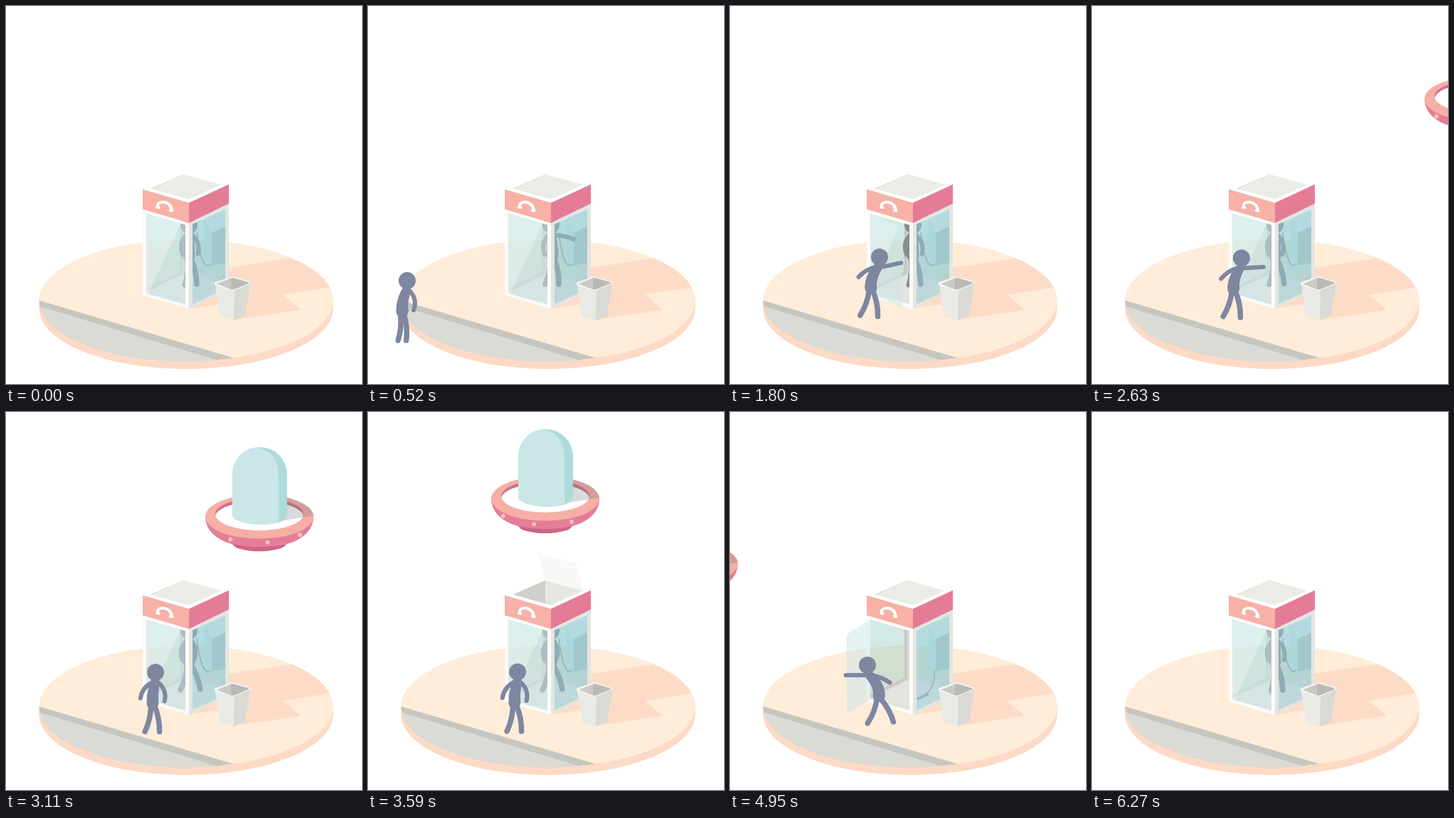
Recreate the animation shown at these times as an HTML page with a canvas. Size 500 px wide and 530 px high, loop 7.47 s.

```html
<!DOCTYPE html>
<html lang="en">
<head>
<meta charset="utf-8">
<title>Phone booth</title>
<style>
  html, body { margin: 0; width: 100%; height: 100%; overflow: hidden; background: #fff; }
  canvas { display: block; width: 500px; height: 530px; }
</style>
</head>
<body>
<canvas id="stage"></canvas>
<script>
const LOOP = 7470, STEP = 40, TAU = Math.PI * 2;
const canvas = document.getElementById('stage');
const ctx = canvas.getContext('2d');
const scale = window.devicePixelRatio || 1;
canvas.width = 500 * scale;
canvas.height = 530 * scale;

// ---- drawing helpers ----
function trace(points) {
  points.forEach((x, i) => {
    if (i % 2 === 0) ctx[i ? 'lineTo' : 'moveTo'](x, points[i + 1]);
  });
  ctx.closePath();
}
function poly(color, ...points) {
  ctx.beginPath();
  trace(points);
  ctx.fillStyle = color;
  ctx.fill();
}
function frame(color, outer, inner) {
  ctx.beginPath();
  trace(outer);
  trace(inner);
  ctx.fillStyle = color;
  ctx.fill('evenodd');
}
function oval(x, y, rx, ry = rx) {
  const path = new Path2D();
  path.ellipse(x, y, rx, ry, 0, 0, TAU);
  return path;
}
function fill(color, path) {
  ctx.fillStyle = color;
  ctx.fill(typeof path === 'string' ? new Path2D(path) : path);
}
function line(color, width, d) {
  ctx.strokeStyle = color;
  ctx.lineWidth = width;
  ctx.lineCap = ctx.lineJoin = 'round';
  ctx.stroke(new Path2D(d));
}
function clipped(path, draw) {
  ctx.save();
  ctx.clip(path);
  draw();
  ctx.restore();
}

// ---- motion helpers ----
function ramp(t, from, to) {
  const k = Math.min(1, Math.max(0, (t - from) / (to - from)));
  return k * k * (3 - 2 * k);
}
// Rises during the first span and falls back during the second.
const pulse = (t, a, b, c, d) => ramp(t, a, b) - ramp(t, c, d);
const mix = (a, b, k) => a.map((v, i) => v + (b[i] - v) * k);

// ---- figure: head position, hip offset, limb angles in degrees from straight down ----
const pose = (x, y, lean, arms, legs) => [x, y, lean, ...arms, ...legs];
const idle = y => pose(210, y, -4, [-37, 19], [-13, 11]);
const reach = pose(210, 352, -12, [-60, 102], [-20, 11]);
const pull = pose(193, 355, 16, [-90, 68], [-21, 29]);
const doorway = pose(224, 343, 4, [-30, 50], [-16, 20]);
const inside = pose(254, 309, 0, [-10, 12], [-6, 10]);
const stoop = pose(256, 315, -4, [-14, 25], [-6, 14]);
const talk = pose(257, 307, 0, [-10, 18], [-5, 13]);
const gesture = pose(257, 307, 2, [-10, 78], [-12, 10]);
const astride = pose(257, 307, 0, [-10, 4], [-15, 21]);

function walk(t) {
  const swing = Math.sin((t - 520) / 480 * TAU);
  return pose(55 + (t - 520) * .149, 385 - (t - 520) * .0317, -7,
    [8 - 28 * swing, 12 + 28 * swing], [-5 + 24 * swing, 5 - 24 * swing]);
}

// Each act eases from wherever the figure is into its next pose.
const act = (t, start, acts) =>
  acts.reduce((now, [from, to, next]) => mix(now, next, ramp(t, from, to)), start);

const visitorPose = t => act(t, walk(Math.min(t, 1560)), [
  [1400, 1600, reach], [1800, 2160, pull], [2310, 2560, reach],
  [2560, 2900, idle(365)], [3400, 4200, idle(361)],
  [4560, 4720, reach], [4720, 4950, pull], [4950, 5110, doorway],
  [5110, 5450, inside], [5830, 6030, stoop], [6030, 6270, talk]
]);

function callerPose(t) {
  const now = act(t, talk, [[100, 400, gesture], [640, 1000, talk], [2400, 2950, astride]]);
  now[1] -= 250 * ramp(t, 3820, 4240);
  return now;
}

function limb(color, x, y, angle, length, bow, width) {
  const a = angle * Math.PI / 180, s = Math.sin(a), c = Math.cos(a);
  const cx = x + s * length / 2 + c * bow, cy = y + c * length / 2 - s * bow;
  line(color, width, `M${x} ${y}Q${cx} ${cy} ${x + s * length} ${y + c * length}`);
}

function person([x, y, lean, ...angles], color) {
  const hipX = x + lean, neckX = x + lean * .1;
  const bend = hipX + lean * .15;
  angles.forEach((angle, i) => {
    const side = i % 2 ? 1 : -1;
    if (i < 2) {
      const bow = side * 9 * Math.max(0, Math.cos(angle * Math.PI / 180));
      limb(color, neckX + side * 4, y + 14, angle, 28, bow, 6);
    } else {
      limb(color, hipX + side * 2.5, y + 47, angle, 37, 4, 7.5);
    }
  });
  for (let k = 0; k <= 1; k += .05) {
    const j = 1 - k;
    const sx = j * j * neckX + 2 * j * k * bend + k * k * hipX;
    fill(color, oval(sx, y + 13 + 32 * k, 5.5 + 3 * Math.sqrt(k)));
  }
  fill(color, oval(x, y, 12));
}

// ---- scenery ----
function ground() {
  const top = oval(253, 412.800, 206.500, 85.300);
  fill('#fcdac5', oval(253, 424, 206.500, 85));
  poly('#fcdac5', 46.5, 413, 459.5, 413, 459.5, 424, 46.5, 424);
  fill('#ffecd9', top);
  clipped(top, () => {
    poly('#fcdcc6', 258, 424, 313, 367, 404, 353, 470, 340, 470, 392, 389, 405, 414, 426, 320, 440, 300, 418);
    poly('#c5c6bf', 40, 411, 325, 495, 325, 520, 40, 520);
    poly('#dadbd4', 40, 419, 305, 499, 305, 520, 40, 520);
  });
}

function bin() {
  poly('#e9eae6', 294, 391, 321, 397, 320, 441, 300, 435);
  poly('#d9dad4', 321, 397, 343, 389, 336, 434, 320, 441);
  fill('#f4f4f1', 'M294 387L315 380Q318 379 321 380L342 386Q345 387.500 342 389.500L322 398Q318 399.500 314 398L294 391.500Q291 389 294 387Z');
  fill('#c9cac5', 'M296 389.500L316 381.500Q318 381 320 381.500L340 387Q342 387.500 340 389.500L321 397Q318 398 315 397Z');
  poly('#b9bab5', 316, 381.5, 320, 381.5, 341, 388, 321, 397, 316, 397.2);
}

function boothBack() {
  const glass = 'rgba(145,200,192,.4)';
  poly('#e3e4de', 192, 403, 249, 376, 313, 391, 313, 397, 257, 425, 192, 406);
  poly(glass, 192, 285, 249, 263, 249, 376, 192, 403);
  poly(glass, 249, 263, 313, 279, 313, 391, 249, 376);
  poly('#c9cac4', 192, 398, 244.5, 373, 244.5, 263, 249, 263, 249, 376, 192, 403);
  poly('#dadbd5', 249, 263, 254, 264, 254, 372, 313, 386, 313, 391, 249, 376);
  poly('#d3e8e8', 279, 298, 308, 288, 308, 309, 289, 318);
  poly('#c2dfe3', 279, 298, 289, 318, 289, 364, 279, 357);
  poly('#b0c3c1', 289, 318, 308, 309, 308, 360, 289, 364);
}

function cord(t) {
  const dropped = pulse(t, 3800, 4020, 5950, 6230);
  const [ax, ay, bx, by, x, y] =
    mix([278, 370, 272, 350, 268, 318], [288, 385, 280, 395, 264, 402], dropped);
  line('#8f9c9b', 1.6, `M287 362C${ax} ${ay} ${bx} ${by} ${x} ${y}`);
  line('#9ba7a6', 4 * dropped + .01, `M${x} ${y}l${13 * dropped} ${-6 * dropped}`);
}

function roof(angle) {
  poly('#e6e7e1', 249, 236, 303, 251, 257, 272, 249, 269);
  poly('#cfd0ca', 203, 256, 249, 236, 249, 269, 257, 272);
  const c = Math.cos(angle), s = Math.sin(angle);
  const dx = -46 * c, dy = 21 * c - 45 * s;
  poly(angle ? '#f8f8f6' : '#ebece8', 249, 236, 249 + dx, 236 + dy, 303 + dx, 251 + dy, 303, 251);
}

function beam(amount, x, y) {
  const length = 110 * amount;
  for (let d = 0; d < length; d += 4) {
    const fade = .85 * (1 - d / length) * (d % 8 ? .85 : 1);
    ctx.fillStyle = `rgba(245,178,170,${fade})`;
    ctx.fillRect(x - 33, y + 134 + d, 67, Math.min(4, length - d));
  }
}

function boothFront(doorAngle) {
  poly('rgba(150,205,215,.5)', 262, 306, 308, 285, 308, 397, 262, 418);
  frame('#fbfbf9', [192, 285, 257, 304, 257, 425, 192, 406], [197, 291, 252, 307, 252, 418, 197, 403]);
  frame('#e4e5e0', [257, 304, 313, 277, 313, 397, 257, 425], [262, 306, 308, 285, 308, 397, 262, 418]);
  poly('#fff', 192, 257, 203, 256, 257, 271, 301, 251, 313, 251, 257, 276);
  poly('#f7b1a7', 192, 257, 257, 276, 257, 304, 192, 285);
  poly('#e47c98', 257, 276, 313, 250, 313, 277, 257, 304);
  line('#fff', 4, 'M212.500 281.500Q213 274 222 275Q232 277 233 287M212 282l2.500 .5M231 286.500l2.500 .5');

  const c = Math.cos(doorAngle), s = Math.sin(doorAngle);
  const dx = 55 * c - 40 * s, dy = 16 * c + 19 * s;
  const at = (u, v) => [197 + dx * u, 291 + dy * u + 112 * v];
  poly('rgba(205,232,234,.55)', ...at(0, 0), ...at(1, 0), ...at(1, 1), ...at(0, 1));
  const shine = .28 * Math.max(0, c);
  poly(`rgba(255,255,255,${shine})`, ...at(0, 0), ...at(.88, 0), ...at(.05, 1), ...at(0, 1));
}

function ship(x, y, t) {
  ctx.save();
  ctx.translate(x, y);
  fill('#ce6584', oval(0, 135, 38, 11));
  const hull = 'M-76 97C-76 117-60 130-38 136Q0 144 38 136C60 130 76 117 76 97Z';
  fill('#e57e98', hull);
  clipped(new Path2D(hull), () => {
    const spin = 9.5 + (t - 3110) * .0468;
    for (let i = 0; i < 8; i++) {
      const a = (spin + i * 45) * Math.PI / 180;
      if (Math.cos(a) > .4) fill('#fbc0b8', oval(70 * Math.sin(a), 108 + 26 * Math.cos(a), 3));
    }
  });
  const rim = oval(0, 97.500, 76, 31), well = oval(0, 94, 62, 23);
  fill('#f6afa5', rim);
  fill('#cf7390', well);
  clipped(well, () => fill('#fff', oval(0, 98, 62, 22)));
  clipped(rim, () => poly('rgba(100,110,125,.25)', 27, 104, 77, 96, 77, 50, 27, 50));
  fill('#acdbda', 'M-38 38A38.500 38 0 0 1 39 38V95Q39 101 27 106Q0 112-24 105Q-38 101-38 95Z');
  fill('#cbe6e7', 'M-38 38A38.500 38 0 0 1 -4 .2Q27 5 27 42V106Q0 112-24 105Q-38 101-38 95Z');
  ctx.restore();
}

// Swoops in from the right, hovers over the booth, dives off to the left.
function shipPosition(t) {
  const k = Math.min(1, Math.max(0, (t - 2520) / 1020));
  const away = Math.max(0, (t - 4390) / 560);
  return [
    249 + 343 * (1 - k) ** 1.35 - 314 * away ** 1.6,
    24 + 26 * Math.sin(Math.PI * k) + 91 * Math.sin(Math.min(1, away) * Math.PI / 2)
  ];
}

// ---- timeline ----
function snap(t) {
  const holds = [[1600, 1800], [2160, 2310], [5550, 5830], [6270, LOOP]];
  const hold = holds.find(([from, to]) => t >= from && t < to);
  if (hold) return hold[0];
  const start = t < 2310 ? 0 : 2310;
  return start + Math.floor((t - start) / STEP) * STEP;
}

function render(now) {
  const t = snap(now % LOOP);
  const [shipX, shipY] = shipPosition(t);
  const indoors = t > 5060;
  const outer = '#7f86a0', shaded = '#868b92';

  ctx.setTransform(scale, 0, 0, scale, 0, 0);
  ctx.clearRect(0, 0, 500, 530);
  ground();
  boothBack();
  cord(t);
  roof(2.11 * pulse(t, 3460, 3680, 4370, 4570));
  beam(pulse(t, 3640, 3820, 4240, 4460), shipX, shipY);
  if (t < 4240) person(callerPose(t), t < 3820 ? shaded : outer);
  if (indoors) person(visitorPose(t), shaded);
  boothFront(1.72 * pulse(t, 1695, 2160, 2310, 2640) + 1.45 * pulse(t, 4710, 4950, 5110, 5430));
  bin();
  if (!indoors && t > 0) person(visitorPose(t), outer);
  ship(shipX, shipY, t);
}

const began = performance.now();
function tick() {
  render(performance.now() - began);
  requestAnimationFrame(tick);
}
tick();
</script>
</body>
</html>
```
